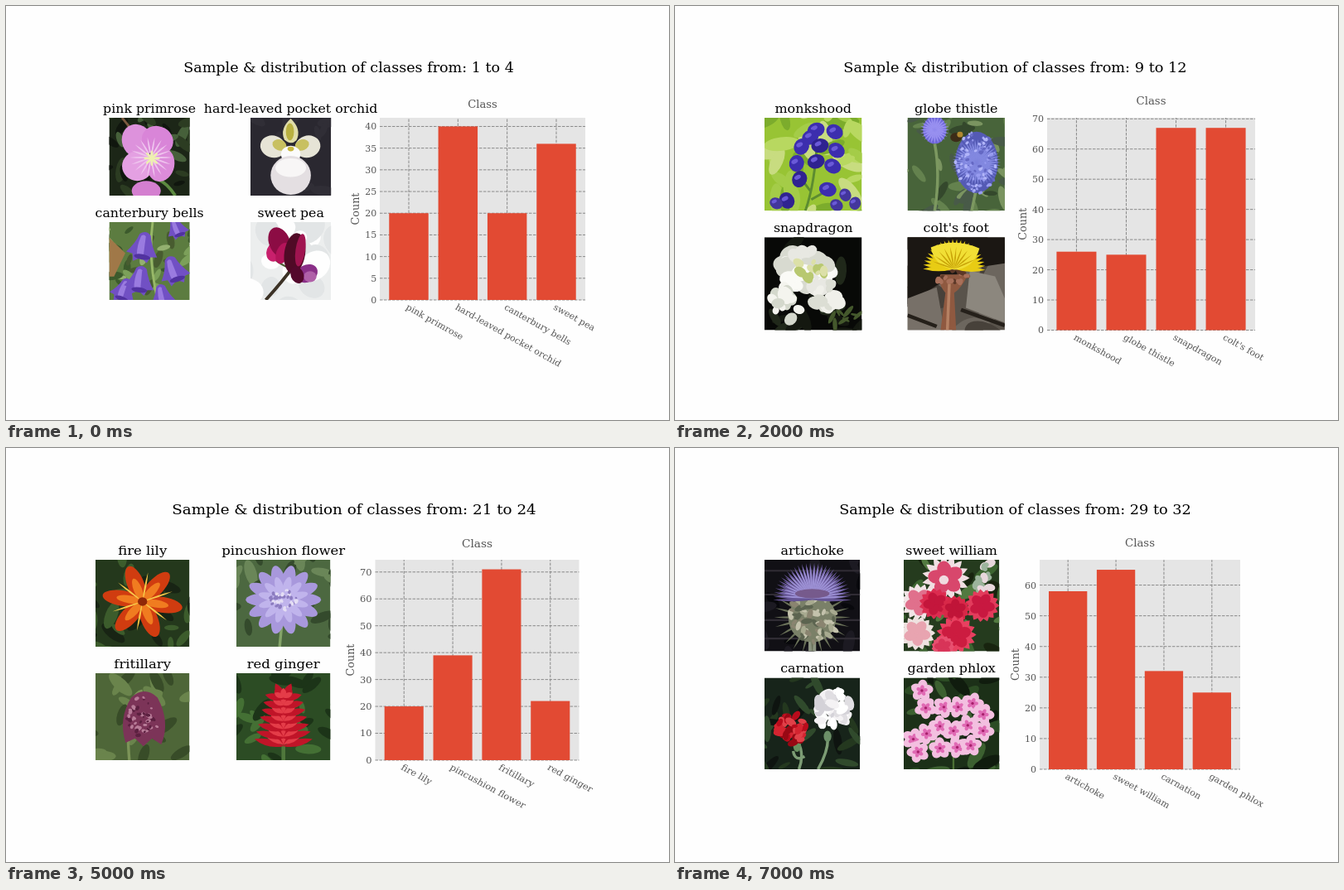
An HTML page for the animation above (8 s loop, 800 by 500 pixels).

```html
<!DOCTYPE html>
<html lang="en">
<head>
<meta charset="utf-8">
<title>Flower classes</title>
<style>
html, body { margin: 0; width: 100%; height: 100%; overflow: hidden; background: #fefefe; }
#stage { display: block; font-family: "DejaVu Serif", serif; }
</style>
</head>
<body>
<svg id="stage" width="800" height="500" viewBox="0 0 800 500"></svg>
<script>
const SLIDE_MS = 1000, TOP = 135, UNIT_Y = 1.06;

let seed = 7;
const rnd = () => (seed = seed * 16807 % 2147483647) / 2147483647;
const times = (n, fn) => Array.from({ length: n }, (_, i) => fn(i)).join('');

// Photo helpers, all in a 100 x 100 box; angles run clockwise from the right.
const oval = (c, x, y, rx, ry = rx, a = 0) =>
  `<ellipse fill="${c}" cx="${x}" cy="${y}" rx="${rx}" ry="${ry}" transform="rotate(${a} ${x} ${y})"/>`;
const shape = (c, d) => `<path fill="${c}" d="${d}"/>`;
const line = (c, w, d) => `<path fill="none" stroke="${c}" stroke-width="${w}" d="${d}"/>`;
const petals = (c, x, y, n, r, w, a = 0, span = 360) => times(n, i =>
  `<ellipse fill="${c}" cx="${x + r / 2}" cy="${y}" rx="${r / 2}" ry="${w / 2}" transform="rotate(${a + span * i / n} ${x} ${y})"/>`);
const spikes = (c, x, y, n, r, w, a = 0, span = 360) => times(n, i =>
  `<path fill="${c}" d="M${x} ${y}q${r / 2} ${-w} ${r} 0q${-r / 2} ${w} ${-r} 0" transform="rotate(${a + span * i / n} ${x} ${y})"/>`);
const dots = (colors, n, x, y, rx, ry, s, thin = .7) => {
  const list = colors.split(' ');
  return times(n, i => {
    const a = rnd() * 6.283, d = Math.sqrt(rnd()), r = s * (.6 + .8 * rnd());
    return oval(list[i % list.length], x + rx * d * Math.cos(a), y + ry * d * Math.sin(a), r, r * thin, rnd() * 180);
  });
};
const ground = (base, colors = base, n = 0, s = 12, thin = .4) =>
  `<rect width="100" height="100" fill="${base}"/>` + dots(colors, n, 50, 50, 72, 72, s, thin);
const bell = (x, y, s, a) => `<g transform="translate(${x} ${y}) rotate(${a}) scale(${s})">` +
  shape('#7150c4', 'M-6-14Q0-20 6-14Q9-2 17 9L10 10L7 17L0 12L-8 17L-10 9L-17 8Q-9-2-6-14') +
  shape('#9a7be0', 'M-4-12Q-1-15 1-12L2 8L-5 10Q-7 0-4-12') + oval('#5132a0', 1, 11, 9, 3) + '</g>';
const phlox = (x, y) => petals('#f3bfe0', x, y, 5, 12, 10, x * 7) + petals('#e06ab4', x, y, 5, 6, 4, x * 7) + oval('#a8206c', x, y, 1.5);
const pink = (c, edge, x, y, r) => spikes(edge, x, y, 15, r, 9) + petals(c, x, y, 5, r * .75, r * .6, x);
const hoods = (c, s, ...xy) => xy.map(([x, y]) => oval(c, x, y, s, s * .85, x * 3) + oval('#6a5ad8', x - 2, y - 2, s * .4, s * .25, -30)).join('');

const slides = [
  { from: 1, u: 1.096, mid: 413.5, cols: [124.5, 295], x: 451, w: 248, bottom: 355, step: 5, items: [
    ['pink primrose', 20, ground('#1c2617', '#2c3c22 #46603a #10160e', 34) + line('#7c5a40', 3, 'M16 0L30 18') +
      line('#5c8a40', 4, 'M62 80Q72 84 82 100') + oval('#d47fd0', 46, 94, 18, 13) + oval('#dd92dc', 35, 30, 19, 22, -20) +
      oval('#d985d8', 60, 29, 20, 18, 30) + oval('#e4a0e2', 35, 62, 19, 19) + oval('#dc8cda', 64, 60, 17, 22, 10) +
      spikes('#efc4ee', 52, 51, 18, 26, 2) + petals('#eef0b0', 53, 52, 8, 10, 3)],
    ['hard-leaved pocket orchid', 40, ground('#2a2830', '#302e36', 10) + oval('#e6e4d6', 28, 37, 16, 14, 20) + oval('#e6e4d6', 71, 37, 16, 14, -20) +
      oval('#c8c060', 36, 35, 9, 7, 25) + oval('#c8c060', 64, 35, 9, 7, -25) + shape('#e0dda8', 'M50 1Q64 15 57 29Q50 36 42 28Q36 14 50 1') +
      oval('#b8b040', 49, 18, 5, 11) + oval('#fbfbfb', 50, 47, 12, 11) + oval('#e4dfe2', 50, 74, 25, 25) + oval('#f8f6f6', 50, 64, 19, 12) + oval('#c8b840', 50, 40, 4, 3)],
    ['canterbury bells', 20, ground('#5c7c40', '#7ca05a #3c5a2c #94b070 #485c30', 44, 10) + shape('#a07848', 'M0 20L20 40L6 70L0 70') + line('#98b868', 3, 'M54 0Q48 46 60 100') +
      bell(84, 8, .8, -20) + bell(18, 88, .95, 20) + bell(42, 32, 1.15, 10) + bell(80, 62, 1.1, -18) + bell(38, 75, 1.1, 8) + bell(66, 95, .9, -10)],
    ['sweet pea', 36, ground('#eceeee', '#fefefe #e2e5e6', 24, 18, .8) + line('#3c3226', 4, 'M54 56Q40 76 19 100') + line('#48582c', 2, 'M50 60Q36 54 28 46') +
      oval('#c8206c', 30, 38, 10, 13, 20) + oval('#8c0c44', 36, 26, 13, 20, -20) + oval('#b4145a', 40, 40, 8, 14, 20) + oval('#8a3088', 70, 66, 14, 11, -30) +
      oval('#b060a8', 74, 70, 8, 7) + oval('#500a26', 55, 40, 13, 26, 8) + oval('#a01450', 62, 36, 6, 21, 8) + oval('#54082c', 58, 68, 8, 11, -20)]] },
  { from: 5, u: 1.08, mid: 415, cols: [120.4, 281], x: 440, w: 227, bottom: 380, step: 10, items: [
    ['english marigold', 45, ground('#2e4a20', '#446a2c #1c3014', 34) + petals('#ec7c08', 50, 50, 26, 40, 8) + petals('#fa9c14', 50, 50, 20, 30, 7, 9) + oval('#8c4408', 50, 50, 11)],
    ['tiger lily', 25, ground('#30482a', '#4c6c3c #1c2c18', 34) + line('#506a30', 3, 'M56 0Q58 30 50 48') + petals('#e8701c', 50, 48, 6, 40, 17, 20) +
      dots('#6c2410', 40, 50, 48, 26, 26, 1.2) + spikes('#9c3c18', 50, 48, 6, 38, 2, 50, 120)],
    ['moon orchid', 20, ground('#4c5c44', '#627454 #38442f', 24, 18) + petals('#e8e4ea', 50, 48, 3, 36, 22, -90) + petals('#f8f5f8', 50, 48, 2, 42, 40, 0) + oval('#c04c88', 50, 57, 7, 10) + oval('#f0cc50', 50, 50, 4)],
    ['bird of paradise', 65, ground('#30482c', '#4a6c3c #203020', 30) + shape('#5c7c44', 'M4 66Q44 48 62 58Q44 64 36 100L24 100Q32 76 4 66') +
      spikes('#f08818', 56, 58, 5, 48, 9, -125, 125) + spikes('#3444b0', 56, 58, 2, 38, 5, -52, 34)]] },
  { from: 9, u: 1.109, mid: 410.5, cols: [108, 280.5], x: 449, w: 251, bottom: 391.5, step: 10, items: [
    ['monkshood', 26, ground('#98c434', '#b8d860 #7cac2c #a4cc48 #c8dc80', 46, 14) + line('#5c8c30', 2.5, 'M54 24Q52 70 42 100M38 66L48 80M65 78L48 88') +
      hoods('#3c2eae', 9, [53, 13], [72, 15], [47, 21], [38, 31], [74, 35], [33, 49], [70, 52], [65, 77]) + hoods('#2f2390', 9, [57, 30], [53, 47], [36, 66], [23, 89]) +
      hoods('#43369c', 7, [83, 83], [93, 92], [74, 94], [12, 92])],
    ['globe thistle', 25, ground('#48643a', '#64824e #34482c #7a9460 #485a48', 48, 11, .35) + oval('#6e66d8', 28, 13, 12, 15) + spikes('#9890f0', 28, 13, 24, 15, 2) +
      line('#7c9860', 3, 'M70 80L66 100M28 28Q34 60 28 100') + oval('#545ab4', 71, 48, 22, 33) + spikes('#8288e0', 71, 48, 46, 25, 2) +
      dots('#989cf0 #6468c4 #b0b4f8', 100, 71, 48, 22, 34, 1.8) + oval('#3c2c18', 50, 21, 6, 5) + oval('#b08830', 54, 18, 3)],
    ['snapdragon', 67, ground('#080907', '#141810 #20281a', 20) + dots('#44582c', 10, 76, 85, 25, 15, 6, .3) +
      dots('#e8e8e2 #fafaf6 #d8dad0', 28, 47, 34, 27, 24, 9, .8) + dots('#f0f0ea #dcded4', 13, 64, 67, 12, 19, 7, .8) + dots('#f4f4ee #d4d8cc', 16, 22, 72, 16, 23, 7, .8) + dots('#b8c870 #dce0a8', 12, 45, 33, 18, 12, 5)],
    ["colt's foot", 67, ground('#59534b', '#6c665e #47413a', 22, 20, .6) + shape('#1b1713', 'M0 0H100V28L62 34L30 52L0 72') + shape('#8c877e', 'M64 36L90 42L100 66V92L60 76') +
      shape('#777068', 'M0 66L30 54L38 100H0') + line('#25201a', 4, 'M55 78L100 95M0 84L30 96') + shape('#8f5940', 'M34 40H62Q56 54 48 60L50 100H34L39 60Q30 48 34 40') + line('#b58163', 3, 'M43 50L41 100') +
      dots('#5c3828 #a8705a', 18, 46, 42, 17, 9, 3) + spikes('#e8cc14', 48, 34, 24, 32, 5, 180, 190) + shape('#f1df35', 'M24 11Q48 0 74 12Q68 34 48 35Q28 32 24 11') + spikes('#c9a408', 48, 34, 10, 24, 1.5, 200, 150)]] },
  { from: 13, u: 1.105, mid: 411, cols: [108, 276], x: 443, w: 243, bottom: 391.5, step: 5, items: [
    ['king protea', 29, ground('#1c2a1e', '#2a3c2a #121a14 #38503a', 44, 12, .15) + dots('#6c9c30 #88b444 #4c7420', 16, 16, 72, 17, 16, 9, .5) + dots('#6c9c30 #507a24', 12, 72, 84, 22, 12, 8, .5) +
      line('#98403c', 6, 'M46 74V100') + spikes('#c84858', 49, 58, 15, 46, 9, 150, 262) + spikes('#e88890', 49, 60, 13, 37, 7, 140, 280) + spikes('#d05060', 49, 62, 9, 28, 7, 20, 150) +
      shape('#dcd5d2', 'M30 50Q36 34 50 33Q66 36 70 52Q64 66 48 67Q34 64 30 50') + spikes('#f6f2f0', 50, 64, 15, 33, 2.5, 200, 150)],
    ['spear thistle', 28, ground('#9c9c64', '#b8b47c #7c8850 #ccc894 #8c9058', 44, 14) + dots('#48683c #64804c #3c5434', 30, 34, 72, 36, 30, 9, .25) + line('#4c6840', 4, 'M47 60Q42 80 44 100M66 74L48 82') +
      oval('#3e5236', 40, 18, 12, 11) + oval('#3e5236', 50, 44, 18, 17) + oval('#42583a', 69, 74, 13, 12) + spikes('#62785a', 50, 44, 26, 22, 2) + spikes('#62785a', 40, 18, 18, 14, 2) + spikes('#62785a', 69, 74, 18, 15, 2) +
      oval('#46603c', 67, 28, 13, 8) + oval('#a848b0', 67, 19, 18, 11) + spikes('#c86cd0', 67, 28, 16, 24, 2, 185, 180)],
    ['yellow iris', 29, ground('#1b2418', '#2c4428 #3c5634 #141a12', 20) + spikes('#47693a', 28, 100, 5, 105, 9, -112, 62) + spikes('#557848', 0, 76, 3, 52, 8, -12, 40) + oval('#5f8150', 92, 40, 5, 22, 60) +
      oval('#d8a010', 74, 62, 3, 7) + shape('#eed73c', 'M7 22Q18 3 33 8Q45 20 50 38Q38 24 24 27Q12 30 7 22') + shape('#f1dc50', 'M94 35Q96 9 84 9Q64 12 54 38Q68 30 94 35') +
      shape('#e8cc30', 'M48 30Q58 28 60 52Q70 76 60 90Q50 100 44 82Q38 60 48 30') + line('#c09818', 1.2, 'M50 40L54 88M58 36L84 16M47 34L18 14M49 64L55 82') + oval('#f4e878', 52, 48, 5, 9)],
    ['globe-flower', 21, ground('#2c4418', '#38541c #20340f #466424', 26, 18) + spikes('#48682a', 42, 92, 5, 46, 8, 170, 230) + oval('#d0bc14', 28, 52, 31, 13, 8) + oval('#c8b830', 62, 57, 18, 7) +
      line('#28480f', 8, 'M44 45Q43 70 42 100') + shape('#ecd924', 'M10 24Q30 2 58 9Q82 10 79 38L88 42Q70 50 44 48Q18 44 16 28') +
      shape('#f5e948', 'M17 24Q36 8 62 16Q76 22 72 36Q40 42 17 24') + line('#c8a810', 1.4, 'M20 26Q40 42 74 38M36 14Q56 20 62 38M46 48Q60 38 80 38')]] },
  { from: 17, u: 1.064, mid: 419, cols: [127.5, 280.5], x: 430, w: 215, bottom: 369.5, step: 10, items: [
    ['purple coneflower', 65, ground('#27351f', '#3c5a2c #141a10 #548040 #302820', 40, 13) + oval('#5c8c3c', 82, 16, 17, 7, -20) + oval('#64943c', 16, 88, 18, 8, 20) + line('#587c3c', 4, 'M56 50L50 100') +
      petals('#c45c9c', 55, 36, 10, 53, 12, 18, 148) + petals('#e394c4', 55, 36, 7, 50, 8, 35, 126) + oval('#6c2810', 55, 31, 18, 14) + dots('#d86820 #f09030 #a43c14', 50, 55, 28, 17, 12, 1.8)],
    ['peruvian lily', 62, ground('#181c16', '#303c28 #10120e', 16) + oval('#d4d0d2', 20, 22, 28, 16, 40) + oval('#dcd9db', 52, 22, 24, 26) + oval('#d8d4d7', 84, 30, 20, 27, 25) + oval('#e2dfe1', 78, 67, 28, 17, 35) + oval('#dedbdd', 17, 60, 26, 18, -20) +
      oval('#e6e4e6', 46, 77, 22, 21) + dots('#f2f0f2 #cbc7ca', 22, 50, 48, 40, 38, 7) + spikes('#a03c58', 48, 58, 13, 48, 1.2, 215, 130) + spikes('#e8e4e6', 48, 58, 13, 25, 3, 215, 130) +
      petals('#98506c', 48, 58, 6, 22, 1.4, 25, 150) + oval('#bcae9a', 48, 61, 7, 5) + dots('#40383c', 6, 48, 57, 15, 9, 2)],
    ['balloon flower', 29, ground('#20281c', '#303c28 #48523e #141a12 #505850', 24, 18, .6) + line('#789850', 3, 'M24 44Q20 70 26 100M47 62Q48 80 42 100') + spikes('#7060d8', 32, 26, 5, 33, 13, 35) + spikes('#a496f6', 32, 26, 5, 25, 7, 35) + oval('#7e6be0', 30, 27, 13, 11) +
      spikes('#7866e4', 60, 53, 5, 30, 15, 15) + oval('#8f7eee', 60, 53, 16, 13) + spikes('#b0a6fa', 60, 53, 5, 25, 4, 15) + oval('#e4e0ff', 58, 55, 3)],
    ['giant white arum lily', 36, ground('#171c14', '#26321e #10130d #303c28', 24) + oval('#2e4824', 24, 86, 16, 8, 45) + shape('#aaa9a9', 'M8 12Q20-4 44 6Q62-6 77 10Q92 36 82 66Q74 96 60 101Q42 100 30 74Q0 48 8 12') +
      shape('#bcbaba', 'M16 18Q30 0 48 12Q68 4 75 24Q82 56 60 84Q44 76 34 54Q12 44 16 18') + shape('#85846f', 'M34 42Q30 20 50 18Q48 34 34 42') + line('#d8841c', 6, 'M37 37L50 24') + dots('#d5d3d3', 9, 58, 55, 8, 12, 3, .3)]] },
  { from: 21, u: 1.145, mid: 420, cols: [108, 278], x: 445.5, w: 246, bottom: 377, step: 10, items: [
    ['fire lily', 20, ground('#24381c', '#3c5c2c #182414', 34) + petals('#d03c10', 50, 48, 6, 43, 18, 10) + petals('#f07c20', 50, 48, 6, 28, 9, 10) + spikes('#f8c848', 50, 48, 6, 34, 2, 40) + oval('#902808', 50, 48, 5)],
    ['pincushion flower', 39, ground('#4c6840', '#6a8658 #344a2c', 30) + line('#84a468', 3, 'M50 55L46 100') + petals('#a898dc', 50, 46, 14, 40, 15) + petals('#c0b4ec', 50, 46, 12, 27, 9, 14) + dots('#e4def4 #8c7cc0', 44, 50, 46, 14, 12, 2)],
    ['fritillary', 71, ground('#4e6638', '#6a844c #384c28', 34) + line('#7c9458', 3, 'M36 100Q30 24 50 20') + shape('#7c3458', 'M38 28Q52 14 66 28Q80 56 70 82L60 75L51 84L42 75L32 80Q24 52 38 28') + dots('#b87c98 #5c2040', 46, 51, 50, 17, 24, 2.2)],
    ['red ginger', 22, ground('#2c4c24', '#447034 #1c3418', 34) + line('#50783c', 4, 'M50 80V100') + times(7, i => spikes('#c01428', 50, 84 - i * 9, 4, 32 - i * 2, 8, 195, 200) + spikes('#e43c48', 50, 82 - i * 9, 3, 23 - i * 2, 6, 210, 180))]] },
  { from: 25, u: 1.034, mid: 429.5, cols: [151, 304], x: 449, w: 218, bottom: 360.5, step: 10, items: [
    ['grape hyacinth', 21, ground('#0c0a04', '#181408 #221c0c', 18) + line('#8ca450', 8, 'M64 70Q67 84 67 100') + dots('#4c5ca8 #6476c0 #35428a', 26, 60, 46, 24, 23, 6, .8) + dots('#5868b4 #7c8cd0', 15, 57, 24, 14, 17, 5, .8) +
      dots('#94a4e0 #3c4890', 30, 59, 42, 23, 28, 2.2) + oval('#8c98bc', 56, 9, 5, 4)],
    ['corn poppy', 21, ground('#182a0e', '#2c4818 #0e180a #446424', 44, 9, .3) + line('#506c30', 2, 'M12 40Q8 70 16 100') + shape('#e41110', 'M38 22Q48 2 66 10Q84 20 82 42Q84 66 70 72Q64 94 44 99Q22 96 24 74Q34 62 38 22') +
      oval('#f43020', 60, 28, 15, 18) + oval('#ce0808', 46, 79, 17, 14, -20) + oval('#f02018', 74, 54, 8, 16, 20) + shape('#540810', 'M46 50Q56 36 63 52Q66 68 50 68') + spikes('#240810', 55, 56, 12, 14, 2)],
    ['prince of wales feathers', 20, ground('#5e6354', '#6c7064 #505446', 18) + dots('#467c34 #5c9844 #2f5c24 #6fa850', 46, 54, 66, 53, 44, 11, .45) + oval('#a02420', 97, 6, 4, 9) + line('#d8a414', 5, 'M40 60L36 18M66 52L69 22') +
      dots('#e8b414 #d09808 #f6cc30', 62, 51, 66, 21, 21, 4) + dots('#ecb820 #d09c0c', 16, 37, 32, 6, 18, 4) + dots('#ecb820 #f4cc3c', 9, 69, 27, 6, 8, 4)],
    ['stemless gentian', 46, ground('#55534e', '#3c3a36 #68665f', 12) + dots('#b4b4b2 #9c9c9c #c8c8c6 #86868a', 66, 46, 36, 65, 44, 9, .75) + dots('#a4a4a0 #888884', 10, 85, 85, 20, 13, 10) + dots('#3f3428', 8, 60, 66, 16, 12, 7) +
      dots('#4a8a34 #68a84c #2c5c20', 34, 38, 82, 24, 16, 7, .4) + shape('#5888c8', 'M60 38L92 40Q80 58 72 70L58 66Q56 54 60 38') + spikes('#276ade', 76, 34, 8, 24, 10, 20) + oval('#3b7de6', 76, 34, 16, 13) + oval('#2452ac', 76, 37, 7, 5)]] },
  { from: 29, u: 1.106, mid: 410.5, cols: [108, 276], x: 440, w: 242, bottom: 388, step: 10, items: [
    ['artichoke', 58, ground('#111015', '#1c1a22 #08080c', 20) + line('#302c34', 2, 'M0 12H100M0 38H100M0 66H100M0 86H100') + line('#8c9480', 8, 'M50 84V100') + spikes('#697058', 50, 63, 24, 40, 2.5) + oval('#7a8068', 50, 64, 25, 26) +
      dots('#a8aa90 #5c6450 #c4c2ac #8a8470', 54, 50, 65, 25, 25, 4.5, .5) + spikes('#665596', 50, 44, 30, 41, 3, 180, 186) + spikes('#9c90d4', 50, 42, 26, 36, 2, 184, 180) + oval('#765a8c', 50, 37, 18, 5)],
    ['sweet william', 65, ground('#253b1e', '#3c6430 #18240f #527a40', 30) + dots('#e8d8dc #9cb49c', 14, 86, 18, 12, 17, 5) + pink('#d8476c', '#f0dfe2', 44, 20, 25) + pink('#e0708c', '#f1e4e6', 16, 46, 20) + pink('#e8a4b0', '#eee2e0', 14, 80, 19) +
      pink('#c4163c', '#dc2c50', 33, 48, 17) + pink('#c81840', '#e23c5c', 82, 50, 18) + pink('#c01438', '#d82848', 54, 54, 15) + pink('#cc1c40', '#e84060', 55, 82, 21) + pink('#d83458', '#e85070', 41, 95, 12) + oval('#f0dce0', 42, 22, 5)],
    ['carnation', 32, ground('#17241a', '#24381f #0e1410 #304a2c', 34, 11, .3) + line('#7c9c74', 3, 'M35 70Q42 84 36 100M66 62Q68 78 56 100M42 86Q32 92 30 80') + oval('#689060', 34, 74, 4, 7) + oval('#6c9068', 66, 64, 4, 6) +
      dots('#b80c1c #d42430 #980814 #e04048', 46, 28, 56, 16, 16, 5, .6) + dots('#f4f2f4 #e0dee2 #ffffff #d4d2d8', 56, 72, 34, 18, 21, 6, .6)],
    ['garden phlox', 25, ground('#1c3018', '#2c4c24 #101c0e #3c6030', 34) + line('#4c7034', 2, 'M52 80V100') + [[19, 14], [23, 33], [42, 32], [57, 32], [72, 28], [83, 40], [10, 67], [24, 61], [38, 53], [52, 58], [67, 52], [83, 58], [15, 81], [38, 77], [56, 76], [70, 74]].map(p => phlox(...p)).join('')]] }
];

function render({ from, u, mid, cols, x, w, bottom, step, items }) {
  const height = bottom - TOP, side = (height - 32) / 2;
  const top = Math.max(...items.map(i => i[1])) * 1.05;
  const tickX = i => x + w * (i + .59) / 4.18;
  const valueY = v => bottom - height * v / top;
  const text = (str, tx, ty, size, anchor = 'middle', angle = 0, dx = 0, dy = 0, fill = '#555') =>
    `<text transform="translate(${tx} ${ty}) scale(${u} ${UNIT_Y}) rotate(${angle})" x="${dx}" y="${dy}" font-size="${size}" text-anchor="${anchor}" fill="${fill}">${str}</text>`;
  const black = (str, tx, ty, size) => text(str, tx, ty, size, 'middle', 0, 0, 0, '#000');

  const photos = items.map(([name, , art], i) => {
    const px = cols[i % 2], py = i < 2 ? TOP : bottom - side, width = side / UNIT_Y * u;
    return `<svg x="${px}" y="${py}" width="${width}" height="${side}" viewBox="0 0 100 100" preserveAspectRatio="none">${art}</svg>` +
      black(name, px + width / 2, py - 6 * UNIT_Y, 14.4);
  }).join('');

  let grid = '', labels = '';
  for (let v = 0; v <= top; v += step) {
    grid += `M${x} ${valueY(v)}h${w}`;
    labels += text(v, x - 3.5 * u, valueY(v), 10, 'end', 0, 0, 3.7);
  }
  const bars = items.map(([name, count], i) => {
    grid += `M${tickX(i)} ${bottom}V${TOP}`;
    labels += text(name, tickX(i), bottom + 3.5 * UNIT_Y, 10, 'start', 30, 0, 7.6);
    const bw = .8 * w / 4.18;
    return `<rect x="${tickX(i) - bw / 2}" y="${valueY(count)}" width="${bw}" height="${bottom - valueY(count)}" fill="#e24a33"/>`;
  }).join('');

  return black(`Sample &amp; distribution of classes from: ${from} to ${from + 3}`, mid, 80.2, 16) + photos +
    `<rect x="${x}" y="${TOP}" width="${w}" height="${height}" fill="#e5e5e5"/>` +
    `<path d="${grid}" stroke="#808080" stroke-width=".9" stroke-dasharray="3.5 1.5"/>` + bars + labels +
    text('Class', x + w / 2, TOP - height * .1, 12, 'middle', 0, 0, 9.1) +
    text('Count', x - 22.6 * u, TOP + height / 2, 12, 'middle', -90);
}

const stage = document.getElementById('stage');
const scenes = slides.map(render);
let shown = -1;
function tick() {
  const index = Math.floor(performance.now() / SLIDE_MS) % scenes.length;
  if (index !== shown) stage.innerHTML = scenes[shown = index];
  requestAnimationFrame(tick);
}
tick();
</script>
</body>
</html>
```
